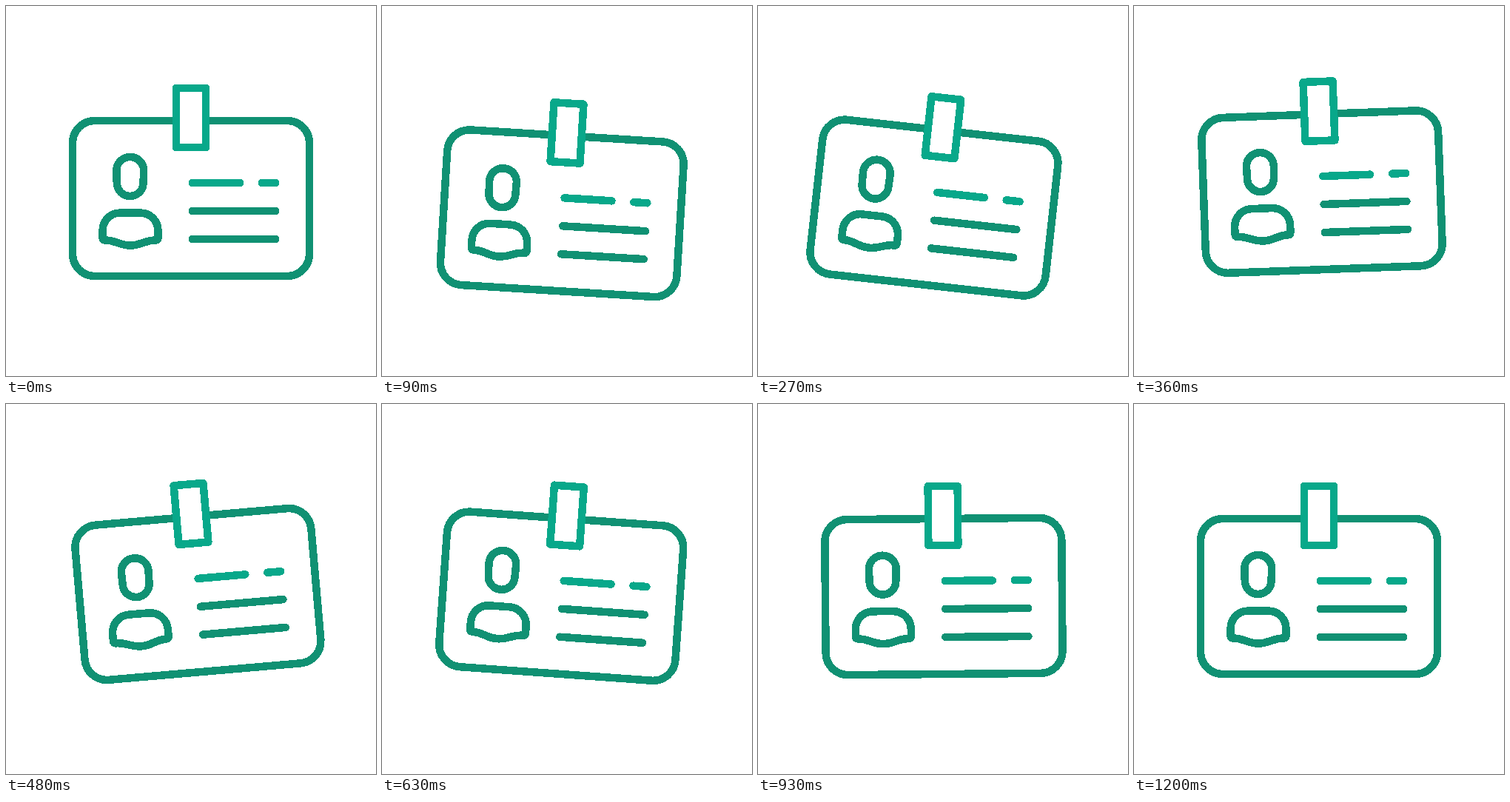
Write an HTML page that moves like this. It is 500x500 px and loops after 4230 ms.

```html
<!DOCTYPE html>
<html lang="en">
<head>
<meta charset="utf-8">
<title>Swinging badge</title>
<style>
  html, body { margin: 0; width: 100%; height: 100%; overflow: hidden; background: #fff; }
  svg { display: block; width: 500px; height: 500px; }
  #badge {
    fill: none;
    stroke: #109173;
    stroke-width: 10.5;
    stroke-linecap: round;
    stroke-linejoin: round;
    shape-rendering: crispEdges;
  }
  #badge .light { stroke: #08a88a; }
  #badge .card { stroke-linecap: butt; }
</style>
</head>
<body>
<svg viewBox="0 0 500 500">
  <g id="badge">
    <path class="card" d="M270 155H380A30 30 0 0 1 410 185V335A30 30 0 0 1 380 365H120A30 30 0 0 1 90 335V185A30 30 0 0 1 120 155H230"/>
    <!-- head and shoulders -->
    <path d="M149.3 222.4A18.4 18.4 0 0 1 186.1 222.4L185.6 239A17.9 17.9 0 0 1 149.8 239Z"/>
    <path d="M130.5 313.5V304C130.5 290 141 279.5 154.5 279.5H181C195 279.5 205.5 290 205.5 304V313.5Q205.5 316.5 202.5 316.5C186 316.5 184 323.5 168 323.5C152 323.5 150 316.5 133.5 316.5Q130.5 316.5 130.5 313.5Z"/>
    <!-- text rows -->
    <path d="M252 277H364M252 315H364"/>
    <path class="light" d="M252 239H316M346 239H364"/>
    <!-- clip -->
    <path class="light" d="M230 111H270V191H230Z"/>
  </g>
</svg>
<script>
const badge = document.getElementById('badge');
const LOOP = 4230;
const STEP = 30;

// Keys are [ms, value]
const SWING = [[0, 0], [210, 8.95], [438, -6.2], [632, 4.1], [825, -2.3], [1030, 1.2], [1200, 0]];
const DROP = [[0, 0], [165, 36], [375, -9.5], [535, 0]];

function valueAt(keys, t) {
  const i = keys.findIndex(k => k[0] > t);
  if (i < 0) return keys[keys.length - 1][1];
  const [t0, a] = keys[i - 1];
  const [t1, b] = keys[i];
  const u = (t - t0) / (t1 - t0);
  return a + (b - a) * u * u * (3 - 2 * u);
}

function draw(t) {
  const drop = valueAt(DROP, t);
  const angle = valueAt(SWING, t);
  badge.setAttribute('transform', `translate(0 ${drop}) rotate(${angle} 250 151)`);
}

const start = performance.now();
function tick() {
  const t = (performance.now() - start) % LOOP;
  draw(Math.floor(t / STEP) * STEP);
  requestAnimationFrame(tick);
}
tick();
</script>
</body>
</html>
```
